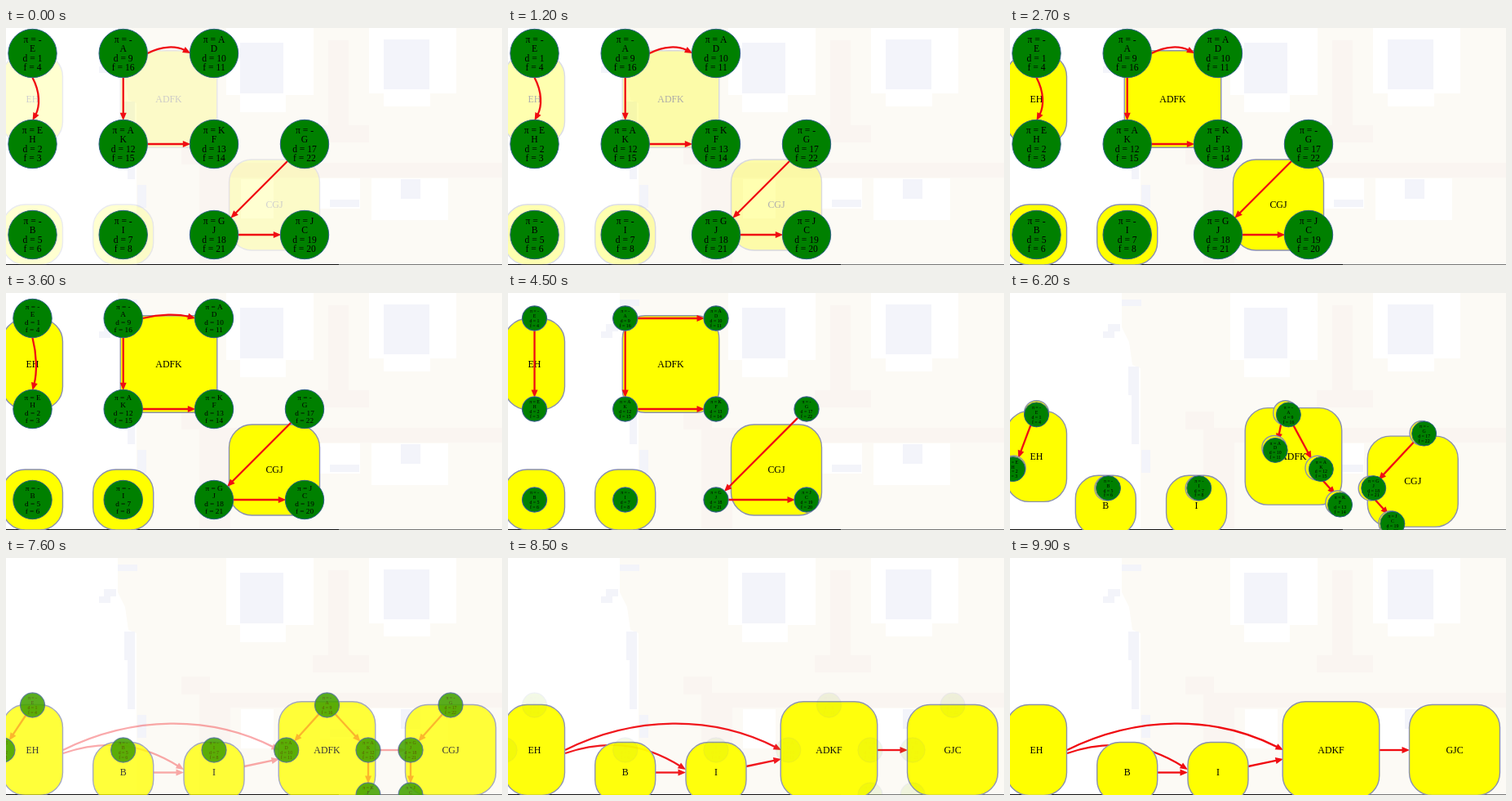
An HTML page that plays this animation: 608x290 px, repeating every 10 s.

```html
<!DOCTYPE html>
<html lang="en">
<head>
<meta charset="utf-8">
<title>Depth-first search forest</title>
<style>
  html, body { margin: 0; width: 100%; height: 100%; overflow: hidden; background: #fff; }
  svg { display: block; width: 608px; height: 290px; }
  text { font-family: "Liberation Serif", "Times New Roman", Times, serif; font-size: 11.9px; text-anchor: middle; }
  .node text { font-size: 11.6px; }
  .cluster rect, .shade { fill: #ff0; stroke: #8a90ae; stroke-width: 1.4; }
  .node circle { fill: #008000; stroke: #2d5f87; stroke-width: 1; vector-effect: non-scaling-stroke; }
  .line { fill: none; stroke: #f00c12; stroke-width: 2.3; }
  .head { fill: #f00c12; }
</style>
</head>
<body>
<svg viewBox="0 0 608 290">
  <g id="wall"></g>
  <rect y="289" width="608" height="1" fill="#777"/>
  <rect y="289" width="408" height="1" fill="#111"/>
  <g id="links"></g>
  <g id="clusters"></g>
  <g id="edges"></g>
  <g id="shades"></g>
  <g id="nodes"></g>
</svg>
<script>
const LOOP = 10000, SPAN = 1500;
const FADE_IN = 960, SHRINK = 2990, NODE_MOVE = 5014, TRAIL_MOVE = 5036, CLUSTER_MOVE = 5057, FADE_OUT = 7075;
const BIG = 29.7, SMALL = 15;

const $ = id => document.getElementById(id);
const mix = (a, b, k) => a + (b - a) * k;
const mixPoint = (a, b, k) => [mix(a[0], b[0], k), mix(a[1], b[1], k)];
const phase = (t, start) => Math.min(1, Math.max(0, (t - start) / SPAN));

function add(parent, tag, attrs = {}, text = "") {
  const el = document.createElementNS("http://www.w3.org/2000/svg", tag);
  set(el, attrs);
  el.textContent = text;
  parent.appendChild(el);
  return el;
}
function set(el, attrs) {
  for (const key in attrs) el.setAttribute(key, attrs[key]);
}

// Pale house front behind the graph
const tones = {
  cream: ["M137 0H608V290H160V92L150 88L146 60L137 42Z"],
  pink: ["M395 15h25v104h25v21h-69v-21h19z", "M215 145h35v20h358v18H275v107h-38V167h-22z"],
  white: ["M270 0h107v82h-34v21h-56V82h-17z", "M445 0h107v80h-32v16h-57V80h-18z",
          "M288 185h40v48h-40z", "M385 184h49v37h-49z", "M448 184h94v51h-94z"],
  blue: ["M287 18h53v62h-53z", "M463 14h56v61h-56z", "M137 8h24v8h-24z", "M120 38h15v9h-7v8h-14v-8h6z",
         "M145 90h13v95h-9v-60h-4z", "M161 192h11v28h-11z", "M397 210h36v9h-36z", "M484 185h24v24h-24z"]
};
const paint = { cream: "#fcfaf5", pink: "#faf5f1", white: "#fff", blue: "#f3f4fa" };
for (const tone in tones) add($("wall"), "path", { d: tones[tone].join(""), fill: paint[tone] });

// label, later label, width, height, start x y, end x y
const clusters = [
  ["EH", "EH", 74, 111, 32.5, 87, 32.5, 235],
  ["B", "B", 74, 74, 32.5, 253, 143.7, 262.5],
  ["I", "I", 74, 74, 143.7, 253, 255, 262.5],
  ["ADFK", "ADKF", 118.5, 118.5, 199.5, 87, 393.5, 235],
  ["CGJ", "GJC", 111, 111, 329, 216.5, 545, 235]
].map(([name, later, w, h, x0, y0, x1, y1]) => {
  const g = add($("clusters"), "g", { class: "cluster" });
  add(g, "rect", { x: -w / 2, y: -h / 2, width: w, height: h, rx: 28 });
  const label = add(g, "text", { y: 3.8 }, name);
  return { g, label, name, later, from: [x0, y0], to: [x1, y1] };
});

// name, parent, discovery, finish, start x y, end x y
const nodes = {};
[
  ["E", "-", 1, 4, 32.5, 31, 32.5, 180],
  ["H", "E", 2, 3, 32.5, 142, -4, 235],
  ["B", "-", 5, 6, 32.5, 253, 143.7, 235],
  ["I", "-", 7, 8, 143.7, 253, 255, 235],
  ["A", "-", 9, 16, 143.7, 31, 393.5, 180],
  ["D", "A", 10, 11, 255, 31, 343.7, 235],
  ["K", "A", 12, 15, 143.7, 142, 444, 235],
  ["F", "K", 13, 14, 255, 142, 444, 290],
  ["G", "-", 17, 22, 366, 142, 545, 180],
  ["J", "G", 18, 21, 255, 253, 496, 235],
  ["C", "J", 19, 20, 366, 253, 496, 290]
].forEach(([name, parent, d, f, x0, y0, x1, y1]) => {
  const shade = add($("shades"), "circle", { class: "shade", r: SMALL });
  const g = add($("nodes"), "g", { class: "node" });
  add(g, "circle", { r: BIG });
  [`π = ${parent}`, name, `d = ${d}`, `f = ${f}`].forEach((line, i) =>
    add(g, "text", { y: -13.5 + i * 11.5 }, line));
  nodes[name] = { g, shade, from: [x0, y0], to: [x1, y1] };
});

function arrow(parent) {
  return { line: add(parent, "path", { class: "line" }), head: add(parent, "path", { class: "head", d: "M0 0L-9.5 -4V4Z" }) };
}
// Cubic from p to q; the shaft stops at the base of the head
function drawArrow({ line, head }, p, a, b, q) {
  const turn = Math.atan2(q[1] - b[1], q[0] - b[0]);
  const base = [q[0] - 8 * Math.cos(turn), q[1] - 8 * Math.sin(turn)];
  set(line, { d: `M${p}C${a} ${b} ${base}` });
  set(head, { transform: `translate(${q}) rotate(${turn * 180 / Math.PI})` });
}

const edges = [["E", "H", 14], ["A", "D", 14], ["A", "K", 0], ["K", "F", 0], ["G", "J", 0], ["J", "C", 0]]
  .map(([tail, tip, bend]) => ({ tail: nodes[tail], tip: nodes[tip], bend, art: arrow($("edges")) }));

[
  [[70, 235], [155, 193], [250, 192], [335, 235]],
  [[70, 239], [120, 222], [165, 226], [218, 259]],
  [[181, 262.5], [190, 262.5], [200, 262.5], [218, 262.5]],
  [[292, 255], [305, 252.3], [318, 249.6], [335, 246]],
  [[453, 235], [465, 235], [475, 235], [490, 235]]
].forEach(points => drawArrow(arrow($("links")), ...points));

const place = (o, k) => mixPoint(o.from, o.to, k);

// Where the line between two centres leaves one circle and meets the other
function ends([x0, y0], [x1, y1], r) {
  const len = Math.hypot(x1 - x0, y1 - y0);
  const ux = (x1 - x0) / len, uy = (y1 - y0) / len, stop = r - 1;
  return [[x0 + ux * r, y0 + uy * r], [x1 - ux * stop, y1 - uy * stop]];
}

function drawEdge({ tail, tip, bend, art }, r, k, straight) {
  const start = ends(tail.from, tip.from, r), end = ends(tail.to, tip.to, r);
  const p = mixPoint(start[0], end[0], k), q = mixPoint(start[1], end[1], k);
  const dx = q[0] - p[0], dy = q[1] - p[1];
  const off = bend * (1 - straight) / Math.hypot(dx, dy);
  const c = [(p[0] + q[0]) / 2 + dy * off, (p[1] + q[1]) / 2 - dx * off];
  drawArrow(art, p, mixPoint(p, c, 2 / 3), mixPoint(q, c, 2 / 3), q);
}

function render(t) {
  const shrink = phase(t, SHRINK), move = phase(t, NODE_MOVE);
  const trail = phase(t, TRAIL_MOVE), slide = phase(t, CLUSTER_MOVE), out = phase(t, FADE_OUT);
  const r = mix(BIG, SMALL, shrink);

  for (const c of clusters) {
    set(c.g, {
      transform: `translate(${place(c, slide)})`,
      opacity: mix(0.18, 1, phase(t, FADE_IN)) * (1 - out * (1 - out))
    });
    c.label.textContent = out < 0.5 ? c.name : c.later;
  }
  for (const name in nodes) {
    const n = nodes[name], [cx, cy] = place(n, trail);
    set(n.g, { transform: `translate(${place(n, move)}) scale(${r / BIG})` });
    set(n.shade, { cx, cy });
  }
  for (const e of edges) drawEdge(e, r, trail, shrink);

  set($("nodes"), { opacity: 1 - out });
  set($("shades"), { opacity: 1 - out });
  set($("edges"), { opacity: Math.max(0, 1 - 2 * out) });
  set($("links"), { opacity: out });
}

function tick() {
  render(performance.now() % LOOP);
  requestAnimationFrame(tick);
}
tick();
</script>
</body>
</html>
```
